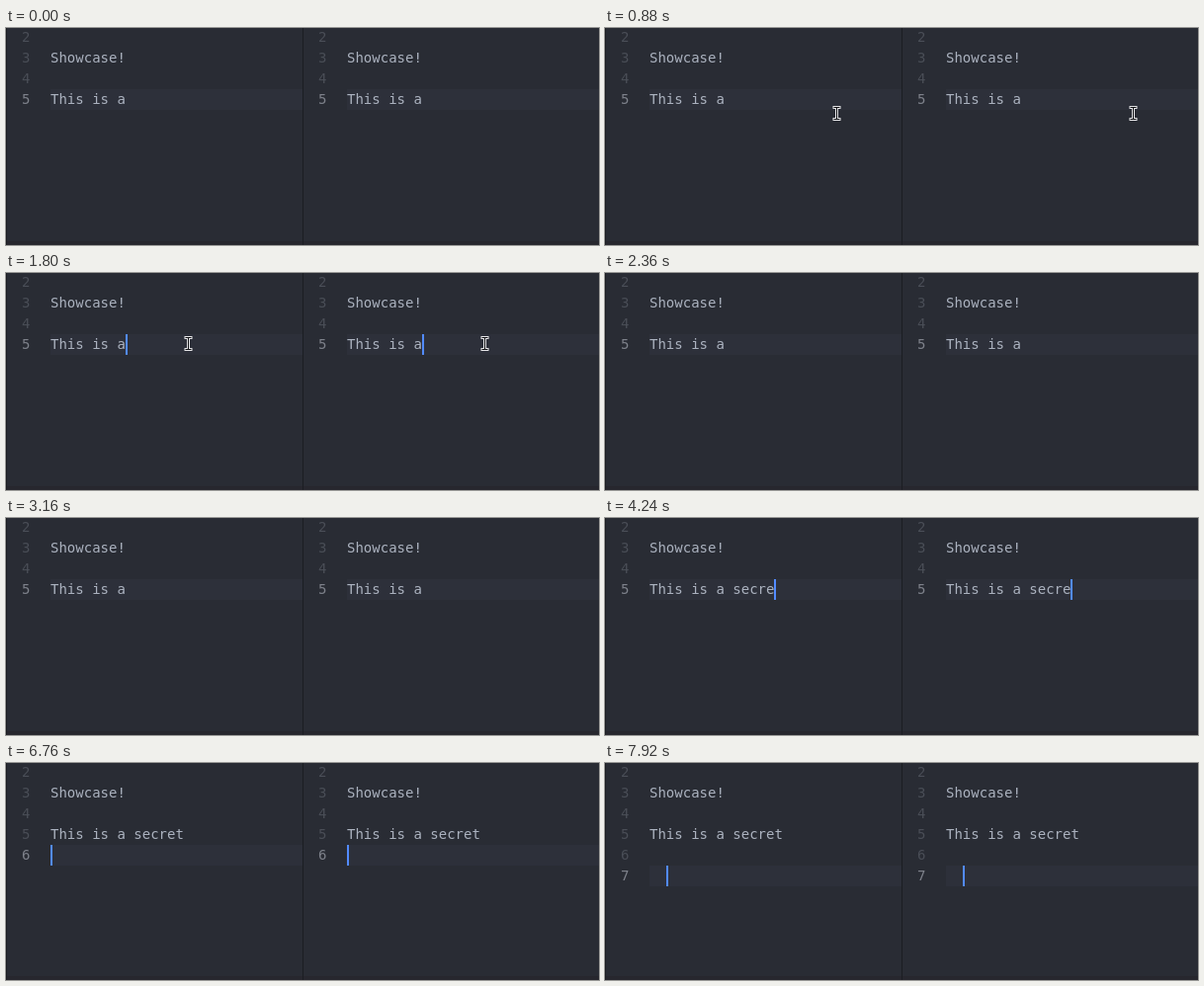
Write an HTML page that moves like this. It is 600x220 px and loops after 8 s.

```html
<!DOCTYPE html>
<html lang="en">
<head>
<meta charset="utf-8">
<style>
  html, body { margin: 0; width: 100%; height: 100%; overflow: hidden; background: #292c34; }
  .pane {
    position: absolute; top: 0; width: 300px; height: 220px; overflow: hidden;
    background: #292c34; font: 14px/21px "DejaVu Sans Mono", monospace; color: #abb2bf;
  }
  .pane + .pane { left: 300px; }
  .pane::before {
    content: ""; position: absolute; z-index: 1; left: 0; top: 0;
    width: 1px; height: 220px; background: #1b1d22;
  }
  .pane::after {
    content: ""; position: absolute; left: 0; top: 216px;
    width: 300px; height: 4px; background: #27272e;
  }
  .pane > * { position: absolute; }
  .band { left: 45px; width: 255px; height: 21px; background: #2d303a; }
  .num { left: 16px; color: #4a4e57; }
  .num.on { color: #7e828b; }
  .text { left: 45px; white-space: pre; }
  .caret { width: 2px; height: 21px; background: #528bff; }
  .mouse { left: 0; top: 0; width: 11px; height: 17px; fill: none; stroke-linecap: square; }
  .edge { stroke: #e4e4e6; stroke-width: 3; }
  .core { stroke: #101114; stroke-width: 1; }
</style>
</head>
<body>
<svg width="0" height="0" style="position:absolute">
  <path id="beam" d="M3 2.5H8M5.5 2.5V14.5M3 14.5H8"/>
</svg>
<script>
const LOOP = 8000, STEP = 40, BLINK = 400;
const CLICK_HOLD = 720, KEY_HOLD = 440;
const CHAR = 14 * 1233 / 2048;
const START = 'This is a';

const rowTop = line => 20 + (line - 3) * 21;
const ramp = (t, from, to) => Math.min(1, Math.max(0, (t - from) / (to - from)));

// Build the editing session; every entry is a complete state
const states = [{ time: 0, line: 5, col: START.length, text: START, hold: 0 }];
const edit = change => states.push({ ...states[states.length - 1], ...change });

function click(time, line) {
  const col = line === 5 ? START.length : 0;
  edit({ time, line, col, hold: CLICK_HOLD });
}

function key(time, char) {
  const { line, col, text } = states[states.length - 1];
  const next = char === '\n' ? { line: line + 1, col: 0 }
    : char === '\t' ? { col: col + 2 }
    : { col: col + 1, text: text + char };
  edit({ time, hold: KEY_HOLD, ...next });
}

const FOCUS = 1120;
click(FOCUS, 4);
click(1640, 5);
// The typing slows down letter by letter
[...' secret'].forEach((c, i) => key(3260 + 120 * i + 12.5 * i * i, c));
key(6520, '\n');
key(7200, '\n');
key(7920, '\t');

function add(pane, cls, line, text = '') {
  const el = document.createElement('div');
  el.className = cls;
  el.style.top = rowTop(line) + 'px';
  el.textContent = text;
  pane.append(el);
  return el;
}

function makePane() {
  const el = document.createElement('div');
  el.className = 'pane';
  document.body.append(el);
  const band = add(el, 'band', 5);
  const nums = Array.from({ length: 6 }, (_, i) => add(el, 'num', i + 2, i + 2));
  add(el, 'text', 3, 'Showcase!');
  const text = add(el, 'text', 5);
  const caret = add(el, 'caret', 5);
  el.insertAdjacentHTML('beforeend',
    '<svg class="mouse"><use href="#beam" class="edge"/><use href="#beam" class="core"/></svg>');
  return { band, nums, text, caret, mouse: el.lastElementChild };
}

const panes = [makePane(), makePane()];

// The pointer comes in from the lower right, drops one row and leaves again
function pointer(t) {
  const away = 1 - ramp(t, 880, 1080) + ramp(t, 1800, 1940);
  const drop = 15 * ramp(t, 1480, 1640);
  return {
    seen: t >= 880 && t < 1960,
    x: Math.round(184 + 50 * away),
    y: Math.round(56 + drop + (30 - drop) * away)
  };
}

function caretOn(t, { time, hold }) {
  const idle = t - Math.ceil(time / STEP) * STEP - hold;
  return t >= FOCUS && (idle < 0 || Math.floor(idle / BLINK) % 2 === 1);
}

const setSeen = (el, seen) => { el.style.visibility = seen ? 'visible' : 'hidden'; };

function show(t) {
  const now = states.filter(s => s.time <= t).pop();
  const mouse = pointer(t);
  for (const p of panes) {
    p.text.textContent = now.text;
    p.band.style.top = p.caret.style.top = rowTop(now.line) + 'px';
    p.caret.style.left = Math.round(45 + now.col * CHAR) + 'px';
    setSeen(p.caret, caretOn(t, now));
    p.nums.forEach((n, i) => {
      n.classList.toggle('on', i + 2 === now.line);
      setSeen(n, i + 2 <= Math.max(5, now.line));
    });
    setSeen(p.mouse, mouse.seen);
    p.mouse.style.transform = `translate(${mouse.x - 5}px, ${mouse.y - 8}px)`;
  }
}

const start = performance.now();
function tick() {
  const t = (performance.now() - start) % LOOP;
  show(Math.floor(t / STEP) * STEP);
  requestAnimationFrame(tick);
}
tick();
</script>
</body>
</html>
```
